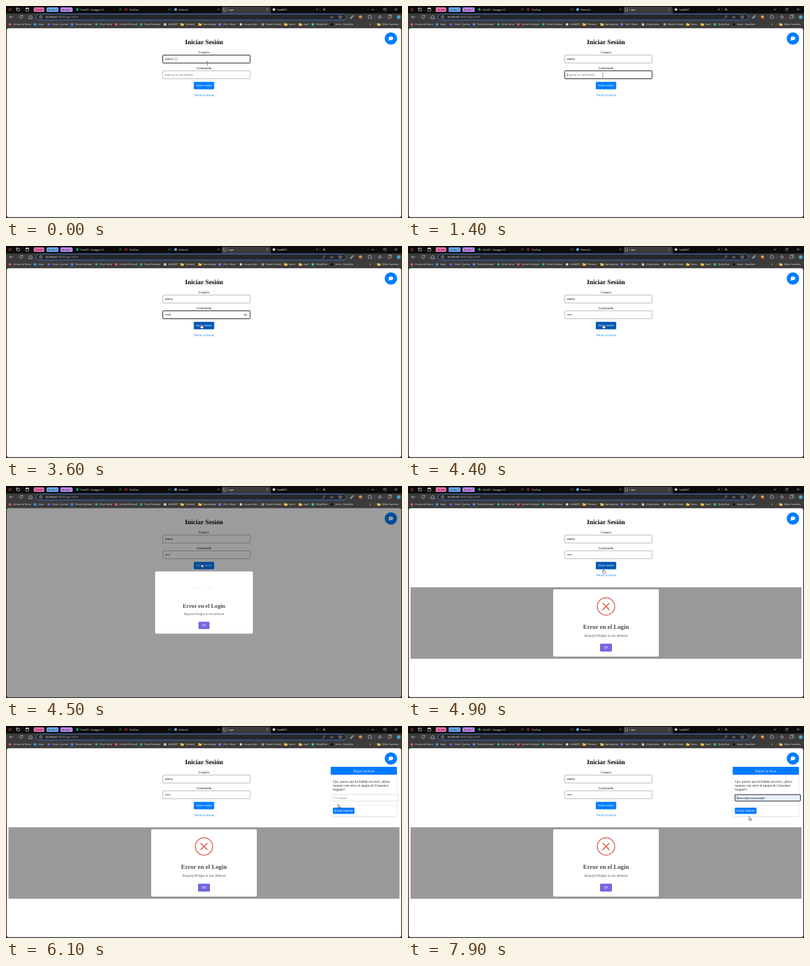
Recreate the animation shown at these times as an HTML page. Size 600 by 322 pixels, loop 8 s.

```html
<!DOCTYPE html>
<html lang="es">
<head>
<meta charset="utf-8">
<title>Login</title>
<style>
html, body { margin: 0; width: 100%; height: 100%; overflow: hidden; background: #2e2e2e; }
svg { display: block; width: 100vw; height: 100vh; text-rendering: geometricPrecision; }
.ui { font-family: "Open Sans", "Noto Sans", sans-serif; }
.sans { font-family: "Liberation Sans", Arial, sans-serif; }
.serif { font-family: "Liberation Serif", "Times New Roman", serif; }
text { white-space: pre; }
</style>
</head>
<body>
<svg id="stage" viewBox="0 0 600 322" preserveAspectRatio="none" xmlns="http://www.w3.org/2000/svg"></svg>
<script>
const LOOP = 8000;
const BLUE = '#007bff', HOVER = '#0056b3', LIGHT = '#e4e4e4';

// Markup helpers
const rect = (x, y, w, h, fill, extra = '') =>
  `<rect x="${x}" y="${y}" width="${w}" height="${h}" fill="${fill}" ${extra}/>`;
const dot = (x, y, r, fill, extra = '') =>
  `<circle cx="${x}" cy="${y}" r="${r}" fill="${fill}" ${extra}/>`;
const line = (d, color = LIGHT, w = 0.6, extra = '') =>
  `<path d="${d}" fill="none" stroke="${color}" stroke-width="${w}" ${extra}/>`;
const text = (x, y, str, size, cls, fill, extra = '') =>
  `<text x="${x}" y="${y}" font-size="${size}" class="${cls}" fill="${fill}" ${extra}>${str}</text>`;
const mid = (x, y, str, size, cls, fill, extra = '') =>
  text(x, y, str, size, cls, fill, 'text-anchor="middle" ' + extra);
const group = (id, body, extra = '') => `<g id="${id}" ${extra}>${body}</g>`;
const cross = (x, y, r, color = LIGHT, w = 0.6) =>
  line(`M${x - r} ${y - r}l${2 * r} ${2 * r}m0 ${-2 * r}l${-2 * r} ${2 * r}`, color, w);
const star = (x, y) => {
  let d = '';
  for (let i = 0; i < 10; i++) {
    const a = i * Math.PI / 5 - Math.PI / 2, r = i % 2 ? 1.2 : 2.6;
    d += (i ? 'L' : 'M') + (x + r * Math.cos(a)).toFixed(2) + ' ' + (y + r * Math.sin(a)).toFixed(2);
  }
  return line(d + 'Z', LIGHT, 0.5);
};
const folder = (x, y) =>
  `<path d="M${x - 2.5} ${y - 2}h2l.7 .7h2.3v3.4h-5z" fill="#f2c14e"/>`;

function tabStrip() {
  let s = rect(0, 0, 600, 12, '#0c0c0c');
  s += dot(6, 5.5, 2.6, '#5b211c');
  s += line('M16.5 4h4v3.5h-4zM15.5 5.5v-2.5h3.5', LIGHT, 0.6);
  s += line('M30 3h4.5v5h-4.5z', LIGHT, 0.6) + rect(30, 3, 4.5, 1.5, LIGHT);
  [[42, 16, '#f06db0', 'Tondel'], [61.5, 18, '#6aa9f7', 'Group 1'], [82.5, 18.5, '#bb86f0', 'Group 1']]
    .forEach(([x, w, c, name]) => {
      s += rect(x, 2, w, 7, c, 'rx="1.6"') + mid(x + w / 2, 6.9, name, 3.8, 'ui', '#1a1a1a');
    });
  s += '<path d="M325 12q2 0 2-2V3q0-2 2-2h70q2 0 2 2v7q0 2 2 2z" fill="#3b3b3b"/>';
  [[108, 'FastAPI - Swagger UI', '#05998b', 173], [182, 'TinoSop', '#7c2222', 248],
   [257, 'VelaroIA', '#6ab0f3', 322], [331, 'Login', '', 396], [406, 'HablBOT', '#c9c9c9', 471]]
    .forEach(([x, name, c, end]) => {
      s += c ? dot(x, 5.3, 2.1, c) : line(`M${x - 1.6} 2.9h2.1l1.2 1.2v3.7h-3.3z`, LIGHT, 0.5);
      s += text(x + 4.9, 6.8, name, 3.7, 'ui', '#f0f0f0') + cross(end, 5.3, 1.1, LIGHT, 0.5);
    });
  s += line('M251.5 3v5M475.5 3v5', '#555', 0.4);
  s += line('M480 5.3h4M482 3.3v4', LIGHT, 0.6);
  s += line('M554 5.3h3.6') + line('M572.3 3.5h3.4v3.4h-3.4z', LIGHT, 0.5) + cross(591, 5.3, 1.7);
  return s;
}

function toolbar() {
  let s = rect(0, 11.3, 600, 22.7, '#3b3b3b');
  s += line('M10.7 16.7h-5.2m2-2l-2 2l2 2', LIGHT, 0.6);
  s += line('M25 15.3a2.4 2.4 0 1 0 .4 1.9M25.3 13.8v1.8h-1.8', LIGHT, 0.6);
  s += line('M34.8 16.5l2.4-2.2l2.4 2.2v2.7h-4.8z', LIGHT, 0.6);
  s += rect(45.5, 12.2, 470, 9, '#262626', 'rx="4.5" stroke="#3f7fdc" stroke-width=".9"');
  s += dot(52.5, 16.7, 2.1, 'none', `stroke="${LIGHT}" stroke-width=".5"`) + line('M52.5 16.2v1.6M52.5 15.2v.5', LIGHT, 0.5);
  s += text(60, 18.2, '<tspan fill="#fff">localhost</tspan>:5000/login.html', 4.15, 'ui', '#a6a6a6');
  s += group('key', dot(482.2, 15.8, 1.1, 'none', 'stroke="#aaa" stroke-width=".5"') +
    line('M481.4 16.6l-2.1 2.1h1.2', '#aaa', 0.5));
  s += text(491.5, 18.2, 'あ', 3, 'ui', LIGHT) + text(494.6, 18.2, 'a', 3.2, 'ui', LIGHT);
  s += star(506.5, 16.7);
  s += line('M522 18.8l.5-1.5l3-3l1 1l-3 3z', '#eee', 0.8);
  s += dot(537, 16.5, 2.3, '#e6a13c') + dot(538.6, 18.2, 1.3, '#d9432f');
  s += line('M549 14.8h1.2a.9 .9 0 1 1 1.7 0h1.3v1.3a.9 .9 0 1 1 0 1.7v1.2h-4.2z', LIGHT, 0.5);
  s += line('M559 13.5v6.5', '#666', 0.4);
  s += star(566.5, 16.7) + line('M579 14.6h4v4.3h-4zM580 13.6h4.3v4', LIGHT, 0.5);
  s += dot(595, 16.7, 2.8, '#4aa3d8');
  return s;
}

function bookmarks() {
  const list = [
    [6, 'Correo de Tarno', '#e2584c'], [44, 'Celar', '#3f97e0'], [65, 'Tarno | Juntea', '#4b6fe0'],
    [100, 'Tarno Calendar', '#4a8cf0'], [137, 'Drive Tarno', '#39a869'], [167, 'Correo Personal', '#e2584c'],
    [205, 'Drive Personal', '#39a869'], [241, 'HablBOT', '#d0d0d0'], [267, 'Temates', ''],
    [294, 'Aprendizaje', ''], [324, 'Vite + React', '#8a6cf0'], [356, 'Cosas utiles', '#c8c8c8'],
    [389, 'Depto Soñado', '#9a9a9a'], [424, 'Autos', ''], [446, 'SaaS', ''],
    [465, 'QuimChat', '#35c95b'], [494, 'Inicio - RutaZeta', '#111'], [565, 'Other favorites', '']
  ];
  const s = list.map(([x, name, c]) =>
    (c ? dot(x, 28, 2.1, c) : folder(x, 28)) + text(x + 4.8, 29.4, name, 3.6, 'ui', '#f2f2f2')).join('');
  return s + line('M550.8 26.4l1.5 1.6l-1.5 1.6', LIGHT, 0.6) + line('M558.5 25v6', '#777', 0.4);
}

const field = (id, y) => rect(237.5, y, 132.4, 12.1, '#fff', `id="${id}" rx="1"`);

function page() {
  let s = rect(1.2, 33.8, 597.6, 287, '#fff', 'rx="3"');
  s += mid(300, 58.2, 'Iniciar Sesión', 9.9, 'serif', '#000', 'font-weight="bold"');
  s += mid(300, 71.8, 'Usuario', 5.05, 'serif', '#000') + field('user', 74.6);
  s += text(241, 82.2, 'admin', 4.4, 'sans', '#111');
  s += group('tag', rect(254, 78.3, 6, 4.6, '#eee', 'rx=".8" stroke="#aaa" stroke-width=".4"') +
    line('M255.5 80.6h3', '#777', 0.6, 'stroke-dasharray=".6 .5"'));
  s += mid(300, 95.8, 'Contraseña', 5.05, 'serif', '#000') + field('pass', 98.4);
  s += text(241, 106, 'Ingresa tu contraseña', 4.35, 'sans', '#757575', 'id="hint"');
  s += text(241, 106.1, '', 4.4, 'sans', '#111', 'id="bullets"');
  s += rect(0, 101.8, 0.4, 5.2, '#222', 'id="caret"');
  s += group('eye', line('M360 104.6q2.6-3 5.2 0q-2.6 3-5.2 0z', '#555', 0.5) + dot(362.6, 104.6, 0.8, '#555'));
  s += rect(284.6, 115.2, 30.8, 11.3, BLUE, 'id="send" rx="1.3"');
  s += mid(300, 122.3, 'Iniciar sesión', 4.2, 'sans', '#fff');
  s += mid(300, 137, 'Volver al inicio', 5, 'serif', BLUE);
  s += dot(583.2, 49.3, 9.4, BLUE);
  s += '<ellipse cx="583.2" cy="49.1" rx="3.5" ry="2.8" fill="#fff"/><path d="M580.4 50l-.9 2.8l3.2-1z" fill="#fff"/>';
  return s;
}

// Dialog is drawn around its own centre
function dialog() {
  const ring = dot(0, 0, 13.2, 'none', 'stroke="#e06a66" stroke-width="1.5"');
  let s = rect(-80, -51, 160, 102, '#fff', 'rx="1.6"');
  s += group('ring', ring) + group('mark', cross(0, -25, 5.2, '#e06a66', 1.7));
  s += mid(0, 8.5, 'Error en el Login', 9.37, 'serif', '#484848', 'font-weight="bold"');
  s += mid(0, 20.9, 'ReportyWidget is not defined', 5.55, 'serif', '#545454');
  s += rect(-9, 31.6, 18, 11.8, '#7066e0', 'rx="1.3"') + mid(0, 39.4, 'OK', 5.3, 'sans', '#fff');
  return s;
}

function panel() {
  let s = rect(492, 63.5, 100.5, 75, '#000', 'opacity=".05" rx="2"') + rect(491.5, 62.5, 101.5, 75, '#000', 'opacity=".09" rx="1.5"');
  s += rect(492, 62, 100.3, 75, '#fff', 'rx="1"') + rect(492, 62, 100.3, 12, BLUE, 'rx="1"');
  s += mid(542.2, 69.8, 'Report an Issue', 5.1, 'serif', '#fff');
  ['Ups, parece que ha habido un error, ¿desea', 'reportar este error al equipo de Consumer', 'Support?']
    .forEach((row, i) => { s += text(495.3, 86 + i * 5.9, row, 5.05, 'serif', '#111'); });
  s += rect(495.5, 104.2, 99, 9.8, '#fff', 'id="mail" rx=".8"');
  s += text(498.5, 110.6, 'Tu correo', 4.2, 'sans', '#757575', 'id="mailText"');
  s += rect(498.1, 106, 0.4, 5.8, '#000', 'id="mailCaret"');
  s += line('M492 120.4H592.3', '#ddd', 0.5);
  s += rect(495.3, 123.9, 32.7, 9.7, BLUE, 'rx="1.2"') + mid(511.6, 130.3, 'Enviar Reporte', 4.2, 'sans', '#fff');
  return s;
}

const pointers =
  group('beam', line('M-1.2 -3.2q1.2 0 1.2 .7q0-.7 1.2-.7M0 -2.7v5.4M-1.2 3.2q1.2 0 1.2-.7q0 .7 1.2 .7', '#333', 0.5)) +
  group('arrow', '<path d="M0 0v5.8l1.4-1.2l1 2.2l.9-.4l-1-2.1h1.8z" fill="#fff" stroke="#111" stroke-width=".5"/>') +
  group('hand', '<path d="M-.6 .5q.6-.9 1.2 0v2.3l2.1 .5q.7 .3 .6 1.1l-.5 2.4h-3.2l-2-2.6q-.1-.9 .8-.6l1 .7z" fill="#fff" stroke="#111" stroke-width=".5"/>');

const stage = document.getElementById('stage');
stage.innerHTML = tabStrip() + toolbar() + bookmarks() + page() +
  rect(1.2, 33.8, 597.6, 287, '#000', 'id="shade" rx="3"') +
  rect(3.8, 153.8, 592.4, 108.6, '#999', 'id="band"') +
  group('dialog', dialog()) + group('panel', panel()) + group('pointer', pointers);

const el = {};
stage.querySelectorAll('[id]').forEach(n => { el[n.id] = n; });
const set = (id, attrs) => { for (const k in attrs) el[id].setAttribute(k, attrs[k]); };
const show = (id, on) => { el[id].style.display = on ? '' : 'none'; };
const outline = (id, on, idle = '#8c8c8c') => set(id, { stroke: on ? '#222' : idle, 'stroke-width': on ? 1 : 0.6 });

// Eased value at time t from rows [time, ...values]
function track(rows, t) {
  let i = 0;
  while (i < rows.length - 1 && t >= rows[i + 1][0]) i++;
  const a = rows[i], b = rows[i + 1];
  if (!b || t < a[0]) return a.slice(1);
  const p = (t - a[0]) / (b[0] - a[0]), e = p * p * (3 - 2 * p);
  return a.slice(1).map((v, k) => v + (b[k + 1] - v) * e);
}

const PATH = [
  [0, 305, 87], [300, 305, 87], [800, 295, 105], [2900, 295, 105], [3600, 296, 118.5],
  [4600, 296, 118.5], [4900, 296.3, 126], [5150, 296.3, 126], [5600, 335, 190],
  [6100, 503, 118.8], [6500, 517, 109], [7200, 517, 109], [7700, 516.7, 137.2]
];
const POP = [[4410, 0.7], [4500, 0.925], [4545, 1.05], [4650, 0.95], [4710, 1]];
const KEYS = [1700, 2000, 2300, 2550, 2750];
const SWAP = { focus: 1000, blur: 4200, alert: 4410, drop: 4800, panel: 5200, mail: 6700, fill: 7300 };

function render(t) {
  const passOn = t >= SWAP.focus && t < SWAP.blur;
  const typed = KEYS.filter(k => t >= k).length;
  const alert = t >= SWAP.alert, dropped = t >= SWAP.drop, modal = alert && !dropped;

  outline('user', t < SWAP.focus);
  outline('pass', passOn);
  show('tag', t < SWAP.focus);
  show('key', t >= SWAP.focus);
  show('hint', !typed);
  el.bullets.textContent = '•'.repeat(typed);
  show('caret', passOn && (typed || t % 1000 < 500));
  set('caret', { x: 241 + typed * 1.54 });
  show('eye', passOn && typed);

  show('shade', modal);
  set('shade', { opacity: 0.39 * Math.max(0, Math.min(1, (t - SWAP.alert) / 80)) });
  show('band', dropped);
  show('dialog', alert);
  if (alert) {
    const scale = dropped ? 1 : track(POP, t)[0];
    set('dialog', { transform: `translate(300 ${dropped ? 208 : 177}) scale(${scale})` });
    const p = Math.min(1, (t - SWAP.alert) / 450);
    const tilt = Math.abs(Math.cos((1 - p) * 100 * Math.PI / 180));
    set('ring', { transform: `translate(0 -25) scale(1 ${tilt})`, opacity: p });
    set('mark', { opacity: Math.max(0, Math.min(1, (t - 4640) / 220)) });
  }

  const [x, y] = track(PATH, t);
  const over = !modal && x > 284 && x < 316 && y >= 115 && y <= 126.5;
  const link = !modal && x > 284 && x < 316 && y >= 132 && y <= 138;
  const mailOver = t >= SWAP.panel && x > 495 && y > 104 && y < 114;
  const kind = over || link ? 'hand' : y < 111 && t < 4000 || mailOver ? 'beam' : 'arrow';
  set('send', { fill: over ? HOVER : BLUE });
  set('pointer', { transform: `translate(${x} ${y})` });
  ['beam', 'arrow', 'hand'].forEach(k => show(k, k === kind));

  const filled = t >= SWAP.fill, mailOn = t >= SWAP.mail;
  show('panel', t >= SWAP.panel);
  outline('mail', mailOn, '#c8c8c8');
  set('mail', { fill: filled ? '#e8f0fe' : '#fff' });
  el.mailText.textContent = filled ? 'tloreviz@mail.example' : 'Tu correo';
  set('mailText', { fill: filled ? '#111' : '#757575' });
  show('mailCaret', mailOn && (t - SWAP.mail) % 1000 < 500 || filled);
}

const start = performance.now();
function tick() {
  render((performance.now() - start) % LOOP);
  requestAnimationFrame(tick);
}
tick();
</script>
</body>
</html>
```
